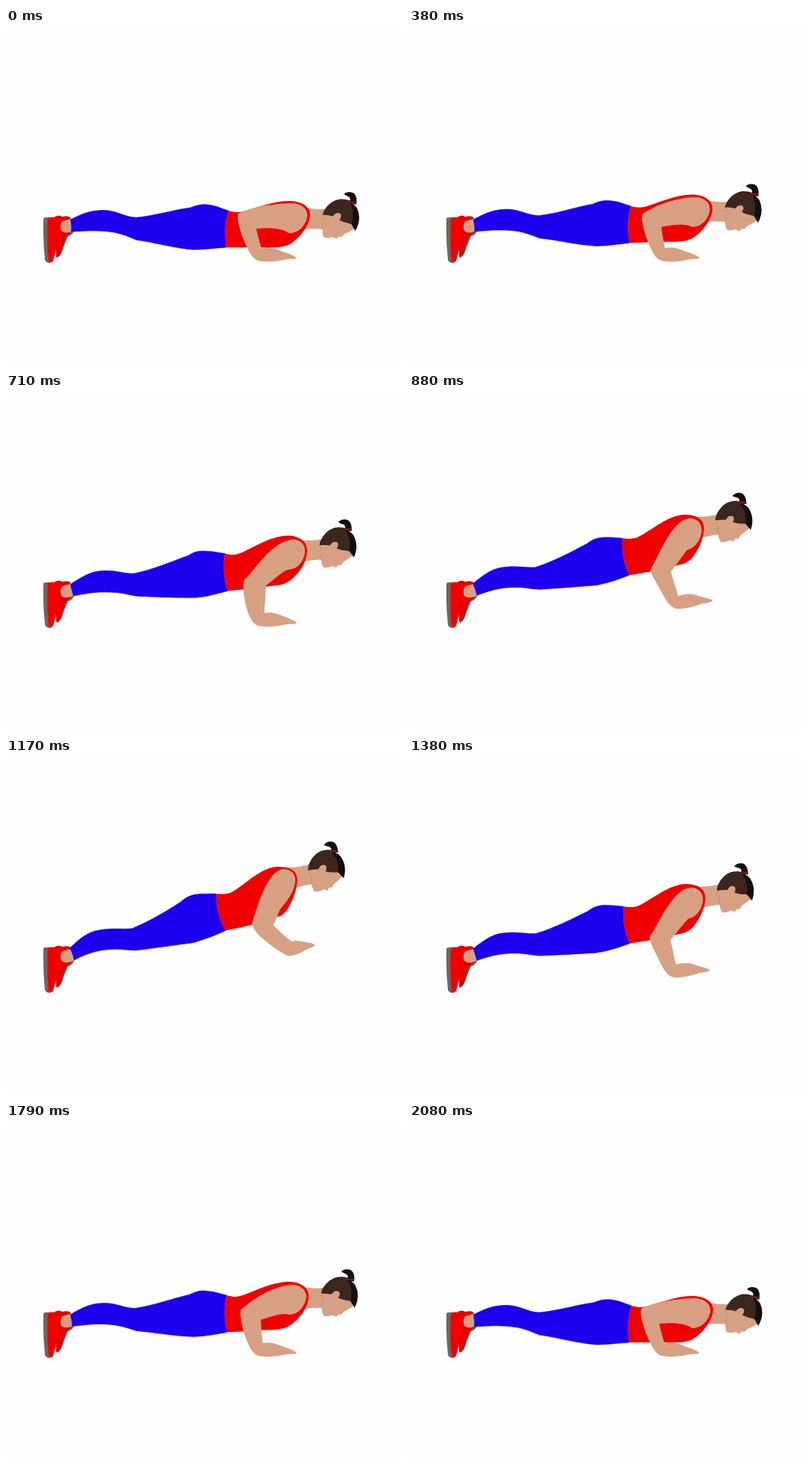
An HTML page that plays this animation: 530x450 px, repeating every 2.12 s.

```html
<!DOCTYPE html>
<html lang="en">
<head>
<meta charset="utf-8">
<title>Plyometric push-up</title>
<style>
  html, body { margin: 0; width: 100%; height: 100%; overflow: hidden; background: #fefefe; }
  svg { display: block; width: 530px; height: 450px; }
  .red { fill: #f20000; }
  .skin { fill: #d8a083; }
  .dark { fill: #14100f; }
</style>
</head>
<body>
<svg viewBox="0 0 530 450">
  <g id="feet">
    <path fill="#70655e" d="M66 252L80 254L91 271Q88 277 83 278L77 292Q74 305 68 307Z"/>
    <path fill="#e00404" d="M65 252Q71 249 75 252Q83 250 86 253L91 269Q86 275 80 279Q77 288 74 298Q72 305 67 306Z"/>
    <path fill="#70655e" d="M50 254Q53 252 57 253L60 313Q55 315 52 310Q49 282 50 254Z"/>
    <path class="red" d="M56 253Q66 251 75 256Q72 264 75 273Q72 280 69 284Q67 297 63 311Q60 314 57 313Q54 283 56 253Z"/>
    <path class="skin" d="M75 258L86 255L92 270Q80 276 74 271Q71 264 75 258Z"/>
  </g>
  <path id="pants" fill="#1c00ee" stroke="#1c00ee" stroke-width=".6"/>
  <g id="head">
    <path class="skin" d="M388 195Q406 198 420 195L456 190Q465 205 462 217C458 220 453 223 449 226C448 229 446 230 443 229L440 233Q437 230 434 231C430 233 426 233 423 232C421 229 421 226 420 222Q406 222 388 227Z"/>
    <path fill="none" stroke="#c78f74" d="M419 205Q422 213 420 222"/>
    <path fill="#3c2620" d="M418 203C419 192 430 180 441 179Q449 178 455 181L461 211C452 210 445 209 441 207Q444 203 442 199Q436 196 432 203Q424 202 418 203Z"/>
    <path class="dark" d="M451 181Q458 183 463 189Q471 203 464 219L458 211Q460 196 454 185Z"/>
    <path class="dark" d="M443 172C446 168 453 167 457 170C461 174 461 179 461 184L452 183C452 179 453 177 450 175C448 174 446 174 443 172Z"/>
    <path stroke="#a01010" stroke-width="2" d="M451 182L460 181"/>
  </g>
  <path id="torso" class="red"/>
  <path id="arm" class="skin"/>
</svg>
<script>
const LOOP = 2120, STEPS = 51;

// Time in ms and height of the top of the hair
const rise = [[0, 219], [380, 208], [540, 194], [710, 168], [880, 132], [1030, 97],
  [1080, 103], [1170, 113], [1580, 170], [1630, 177], [2080, 219], [2120, 219]];

// Every shape is a list of poses: [height, path]
const shapes = {
  pants: [
    [219, 'M88 255C98 250 110 244 126 243.5C146 242 158 253 174 253C198 251 222 243 246 240C256 236 262 235 270 236C280 237 288 241 297 244C291 262 292 278 294 293C278 294 264 296 250 296C224 294 198 286 174 283C160 277 150 273 134 271.5C118 270 104 271 87 272C88 266 87 260 86 256Z'],
    [168, 'M88 254C100 247 112 238 128 237.5C146 236 156 241 170 241C196 236 220 225 243 217C252 211 258 210 268 211C276 211 284 213 292 214C289 232 291 250 296 264C280 268 266 273 248 273C222 273 198 272 174 271C162 269 152 266 140 266C120 265 106 268 90 271C89 266 87 260 86 256Z'],
    [113, 'M87 252C96 244 108 232 124 230C142 227 154 229 168 228C192 218 216 204 234 192C242 185 250 182 262 182C268 182 274 181.5 281 182C280 200 285 216 293 231C278 238 264 243 250 247C226 250 200 254 174 257C162 257 154 255 144 255.5C122 256 106 262 91 270C90 264 88 258 85 254Z']
  ],
  torso: [
    [219, 'M297 244C304 246 312 247 320 244C338 239 358 231 378 231C394 231 406 238 406 249C406 262 394 279 380 288C370 294 356 293 344 293C328 293 312 293 294 293C292 278 291 262 297 244Z'],
    [168, 'M292 214C298 216 306 217 314 213C334 204 354 190.5 376 190C392 190 402 198 402 210C401 226 394 236 384 246C376 254 366 257 356 257C338 259 318 262 296 264C291 250 289 232 292 214Z'],
    [113, 'M281 182C288 182 294 183 301 180C318 171 340 147 362 146C378 146 390 150 389 165C388 178 383 192 375 204C371 209 367 212 362 213C346 220 318 226 293 231C285 216 280 200 281 182Z']
  ],
  arm: [
    [219, 'M380 234C396 234 404 243 402 253C399 267 388 274 378 274C370 268 356 266 334 268C336 276 338 285 341 294C350 291 362 295 370 299C378 301 385 304 388 307C388 309 380 308 374 309C362 312 348 313 338 311C328 309 322 294 316 280C312 268 308 256 310 248C322 241 350 235 380 234Z'],
    [168, 'M382 195C394 195 400 203 399 212C398 224 390 234 379 235C370 236 362 246 347 257C347 270 345 282 345 294C352 292 364 295 370 298C378 301 385 304 388 307C388 309 380 308 374 309C362 312 348 313 337 311C327 308 322 292 319 278C317 266 316 256 318 250C336 232 353 200 382 195Z'],
    [132, 'M374 166C386 166 392 175 390 186C387 200 378 207 371 208C364 218 356 229 350 238C353 250 357 260 360 270C368 267 378 266 385 269C394 272 402 273 406 275C406 278 398 279 392 280C382 284 368 288 357 287C346 283 341 270 333 256C327 246 322 240 323 234C334 216 351 168 374 166Z'],
    [113, 'M370 149C382 149 388 157 386 168C384 182 374 193 366 203C363 210 360 218 357 224C365 232 374 240 382 246C388 243 396 246 402 247C407 247 411 249 413 251C411 253 404 255 400 257C394 261 386 265 377 265C366 260 352 250 342 241C334 234 328 226 329 220C335 202 348 152 370 149Z']
  ],
  // Shift of the chin, then tilt around it
  head: [
    [219, 'translate(1 47) rotate(7 424 232)'],
    [168, 'translate(0.5 0) rotate(0 424 232)'],
    [113, 'translate(-11 -53) rotate(-7 424 232)']
  ]
};

const $ = id => document.getElementById(id);
const NUMBER = /-?\d+(\.\d+)?/g;

function morph(poses, h) {
  let i = 1;
  while (i < poses.length - 1 && h < poses[i][0]) i++;
  const [h0, from] = poses[i - 1], [h1, to] = poses[i];
  const u = (h - h0) / (h1 - h0), ends = to.match(NUMBER);
  let k = 0;
  return from.replace(NUMBER, n => (+n + (ends[k++] - n) * u).toFixed(2));
}

function slope(i) {
  const a = rise[i - 1], b = rise[i], c = rise[i + 1];
  if (!a || !c || (b[1] - a[1]) * (c[1] - b[1]) <= 0) return 0;
  return (c[1] - a[1]) / (c[0] - a[0]);
}

// Cubic Hermite curve through the knots
function heightAt(t) {
  let i = 0;
  while (t >= rise[i + 1][0]) i++;
  const [t0, h0] = rise[i], [t1, h1] = rise[i + 1];
  const d = t1 - t0, u = (t - t0) / d, v = 1 - u;
  return h0 * v * v * (1 + 2 * u) + h1 * u * u * (3 - 2 * u)
    + d * u * v * (slope(i) * v - slope(i + 1) * u);
}

function draw(now) {
  const step = LOOP / STEPS;
  const h = heightAt(Math.floor(now % LOOP / step) * step);
  const lift = Math.max(0, 113 - h);
  $('pants').setAttribute('d', morph(shapes.pants, h));
  $('torso').setAttribute('d', morph(shapes.torso, h));
  $('head').setAttribute('transform', morph(shapes.head, h));
  $('arm').setAttribute('d', morph(shapes.arm, h + lift));
  // Above the last pose the bent arm travels with the shoulder
  $('arm').setAttribute('transform', `translate(${-0.22 * lift} ${-0.84 * lift})`);
}

const start = performance.now();
function tick() {
  draw(performance.now() - start);
  requestAnimationFrame(tick);
}
tick();
</script>
</body>
</html>
```
